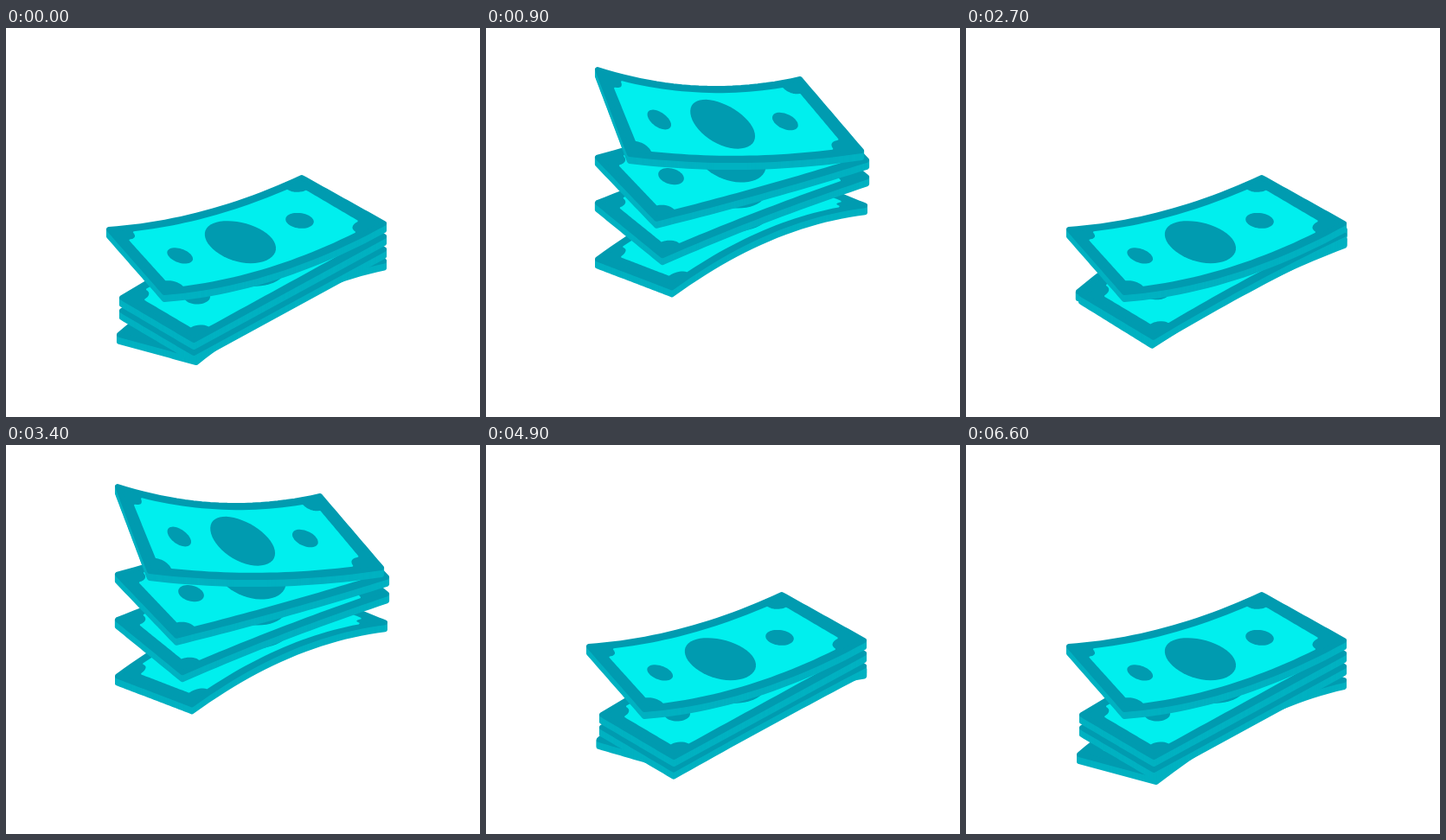
Recreate the animation shown at these times as an HTML page with a canvas. Size 548x450 px, loop 7000 ms.

```html
<!DOCTYPE html>
<html lang="en">
<head>
<meta charset="utf-8">
<title>Bouncing banknotes</title>
<style>
  html, body { margin: 0; width: 100%; height: 100%; overflow: hidden; background: #fff; }
  canvas { display: block; }
</style>
</head>
<body>
<canvas id="stage" width="548" height="450"></canvas>
<script>
const ctx = document.getElementById('stage').getContext('2d');
const LOOP = 7000, STEP = 100, THICKNESS = 8;
const BOUNCES = [0, 2500, 4820, LOOP];
const RIM = '#009bb0', SIDE = '#00b1c1', FACE = '#00efee';

// A pose is left, top, right and bottom corner, then the bend of the far and near edge.
// rise and fall are [start, duration] in ms; peak is the height relative to the "high" pose.
const bills = [
  { low: [131, 358, 351, 241, 437, 272, 220, 382, -17, -15],
    high: [129, 267, 351, 170, 438, 205, 215, 300, -17, -17],
    rise: [-60, 620], fall: [648, 617], peak: 1.55, droop: 4 },
  { low: [134, 327, 346, 202, 437, 256, 217, 376, 0, 0],
    high: [129, 203, 364, 110, 440, 173, 204, 264, 0, -3],
    rise: [60, 640], fall: [735, 540], peak: 1.28, droop: 12 },
  { low: [134, 312, 346, 187, 437, 241, 217, 361, 0, 0],
    high: [129, 150, 372, 82, 440, 153, 197, 221, 0, 2],
    rise: [140, 640], fall: [823, 560], peak: 1.05, droop: 12 },
  { low: [119, 233, 342, 173, 437, 226, 183, 306, 11, 15],
    high: [129, 48, 363, 59, 434, 142, 166, 146, 16, 9],
    rise: [220, 650], fall: [920, 640], peak: 1, droop: 12 }
];

const clamp = x => Math.min(1, Math.max(0, x));
const ease = x => (1 - Math.cos(Math.PI * x)) / 2;
const mix = (a, b, f) => a + (b - a) * f;
const progress = (time, [start, length]) => clamp((time - start) / length);

// Outlines in bill coordinates: u along the long side, v across it.
function edge(u0, v0, u1, v1) {
  return Array.from({ length: 24 }, (_, i) => [mix(u0, u1, i / 24), mix(v0, v1, i / 24)]);
}
function ellipse(u, v, ru, rv) {
  return Array.from({ length: 48 }, (_, i) => {
    const a = i * Math.PI / 24;
    return [u + ru * Math.cos(a), v + rv * Math.sin(a)];
  });
}
function notch(cu, cv, from) {
  return Array.from({ length: 9 }, (_, i) => {
    const a = (from - i / 8) * Math.PI / 2;
    return [cu + .052 * Math.cos(a), cv + .11 * Math.sin(a)];
  });
}

const outline = [
  ...edge(0, 0, 1, 0), ...edge(1, 0, 1, 1), ...edge(1, 1, 0, 1), ...edge(0, 1, 0, 0)
];
const U = .055, V = .075;
const face = [
  ...notch(U, V, 1), ...edge(U + .052, V, 1 - U - .052, V),
  ...notch(1 - U, V, 2), ...edge(1 - U, V + .11, 1 - U, 1 - V - .11),
  ...notch(1 - U, 1 - V, 3), ...edge(1 - U - .052, 1 - V, U + .052, 1 - V),
  ...notch(U, 1 - V, 4), ...edge(U, 1 - V - .11, U, V + .11)
];
const marks = [
  ellipse(.5, .5, .13, .34), ellipse(.21, .5, .05, .125), ellipse(.79, .5, .05, .125)
];

function trace(pose, points, dy = 0) {
  const [ax, ay, bx, by, cx, cy, dx, dY, far, near] = pose;
  ctx.beginPath();
  for (const [u, v] of points) {
    const x = mix(mix(ax, bx, u), mix(dx, cx, u), v);
    const y = mix(mix(ay, by, u), mix(dY, cy, u), v);
    ctx.lineTo(x, y + dy + mix(far, near, v) * 4 * u * (1 - u));
  }
  ctx.closePath();
}

function drawBill(pose) {
  ctx.lineJoin = 'round';
  ctx.lineWidth = 6;
  for (let dy = THICKNESS; dy >= 0; dy--) {
    ctx.fillStyle = ctx.strokeStyle = dy ? SIDE : RIM;
    trace(pose, outline, dy);
    ctx.fill();
    ctx.stroke();
  }
  ctx.fillStyle = ctx.strokeStyle = FACE;
  ctx.lineWidth = 2;
  trace(pose, face);
  ctx.fill();
  ctx.stroke();
  ctx.fillStyle = RIM;
  for (const mark of marks) {
    trace(pose, mark);
    ctx.fill();
  }
}

function poseAt(bill, time) {
  const up = progress(time, bill.rise), down = progress(time, bill.fall);
  const height = bill.peak * (ease(up) - ease(down));
  const pose = bill.low.map((value, i) => mix(value, bill.high[i], height));
  let bend = -bill.droop * Math.sin(Math.PI * up);
  if (bill === bills[3]) {
    const settle = progress(time, [1480, 300]);
    bend += 4 * Math.sin(2 * Math.PI * settle) * (1 - settle);
  }
  pose[8] += bend;
  pose[9] += bend;
  return pose;
}

function draw(now) {
  const t = Math.floor((now % LOOP) / STEP) * STEP;
  const start = BOUNCES.filter(b => t >= b - 60).pop();
  ctx.fillStyle = '#fff';
  ctx.fillRect(0, 0, 548, 450);
  bills.forEach(bill => drawBill(poseAt(bill, t - start)));
}

const begin = performance.now();
function tick() {
  draw(performance.now() - begin);
  requestAnimationFrame(tick);
}
tick();
</script>
</body>
</html>
```
